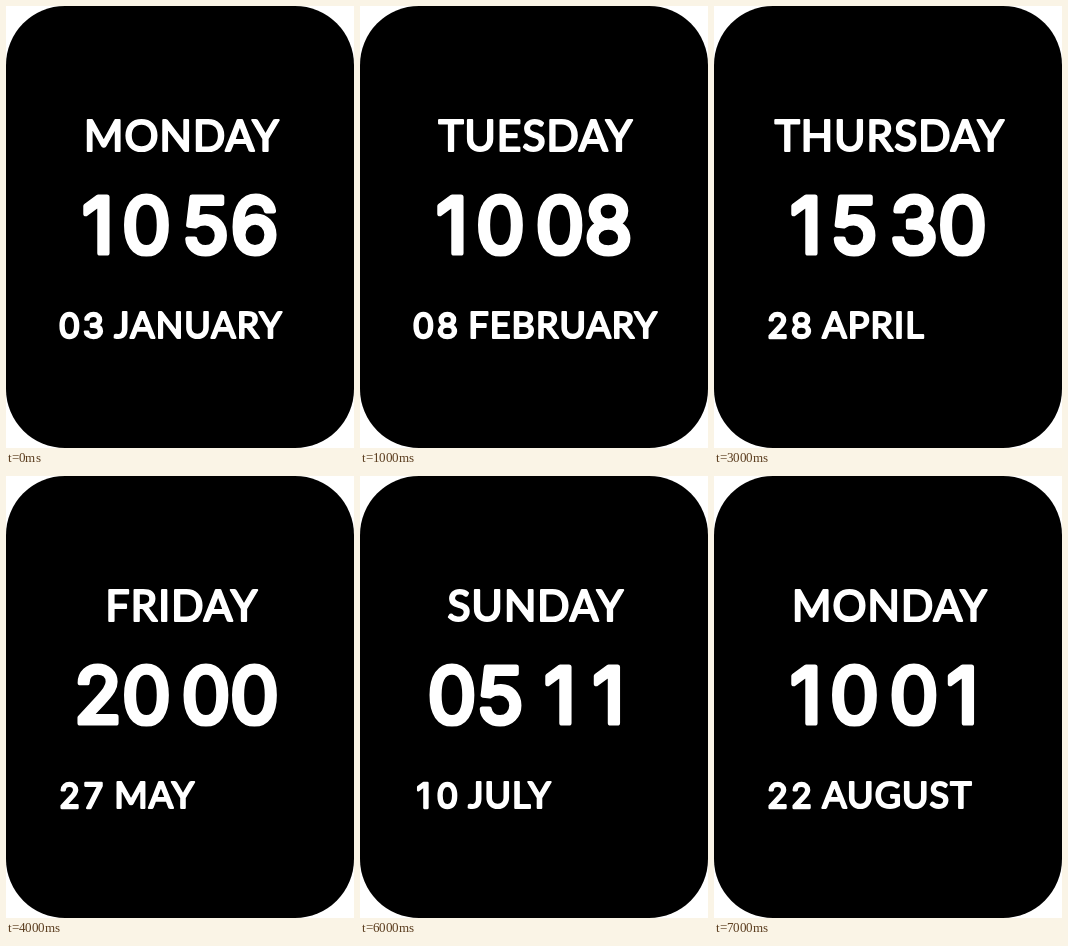
An HTML page for the animation above (8000 ms loop, 348x442 px).

```html
<!DOCTYPE html>
<html lang="en">
<head>
<meta charset="utf-8">
<title>Watch face</title>
<style>
  html, body { margin: 0; width: 100%; height: 100%; overflow: hidden; background: #fff; }
  svg { display: block; width: 348px; height: 442px; }
  text { fill: #fff; stroke: #fff; stroke-linejoin: round; stroke-linecap: round; }
  .word { font-family: Lato, sans-serif; }
  .num { font-family: Inter, sans-serif; text-anchor: middle; }
  #day { font-size: 42.4px; stroke-width: 2.2px; text-anchor: middle; letter-spacing: 1.1px; }
  #month { font-size: 36px; stroke-width: 2.1px; letter-spacing: 1.1px; }
  #date { font-size: 34.5px; stroke-width: 2.3px; }
  #hour, #minute { font-size: 77.5px; stroke-width: 5.2px; }
</style>
</head>
<body>
<svg viewBox="0 0 348 442">
  <rect width="348" height="442" rx="59"/>
  <text id="day" class="word" x="175.9" y="145.2"></text>
  <text id="hour" class="num" y="246.8"></text>
  <text id="minute" class="num" y="246.8"></text>
  <text id="date" class="num" y="332.4"></text>
  <text id="month" class="word" x="108.2" y="332.4"></text>
</svg>
<script>
  const STEP = 1000;
  const faces = [
    ["MONDAY", "10", "56", "03", "JANUARY"],
    ["TUESDAY", "10", "08", "08", "FEBRUARY"],
    ["WEDNESDAY", "10", "26", "09", "MARCH"],
    ["THURSDAY", "15", "30", "28", "APRIL"],
    ["FRIDAY", "20", "00", "27", "MAY"],
    ["SATURDAY", "04", "43", "25", "JUNE"],
    ["SUNDAY", "05", "11", "10", "JULY"],
    ["MONDAY", "10", "01", "22", "AUGUST"]
  ];
  const $ = id => document.getElementById(id);

  // Centre each of the two digits in its own cell.
  function setDigits(id, digits, center, pitch) {
    $(id).setAttribute("x", `${center} ${center + pitch}`);
    $(id).textContent = digits;
  }

  function show([day, hour, minute, date, month]) {
    $("day").textContent = day;
    setDigits("hour", hour, 92, 48.5);
    setDigits("minute", minute, 200, 48.5);
    setDigits("date", date, 63.5, 24);
    $("month").textContent = month;
  }

  let shown = -1;
  const start = performance.now();
  function tick() {
    const now = Math.floor((performance.now() - start) / STEP) % faces.length;
    if (now !== shown) show(faces[shown = now]);
    requestAnimationFrame(tick);
  }
  tick();
</script>
</body>
</html>
```
